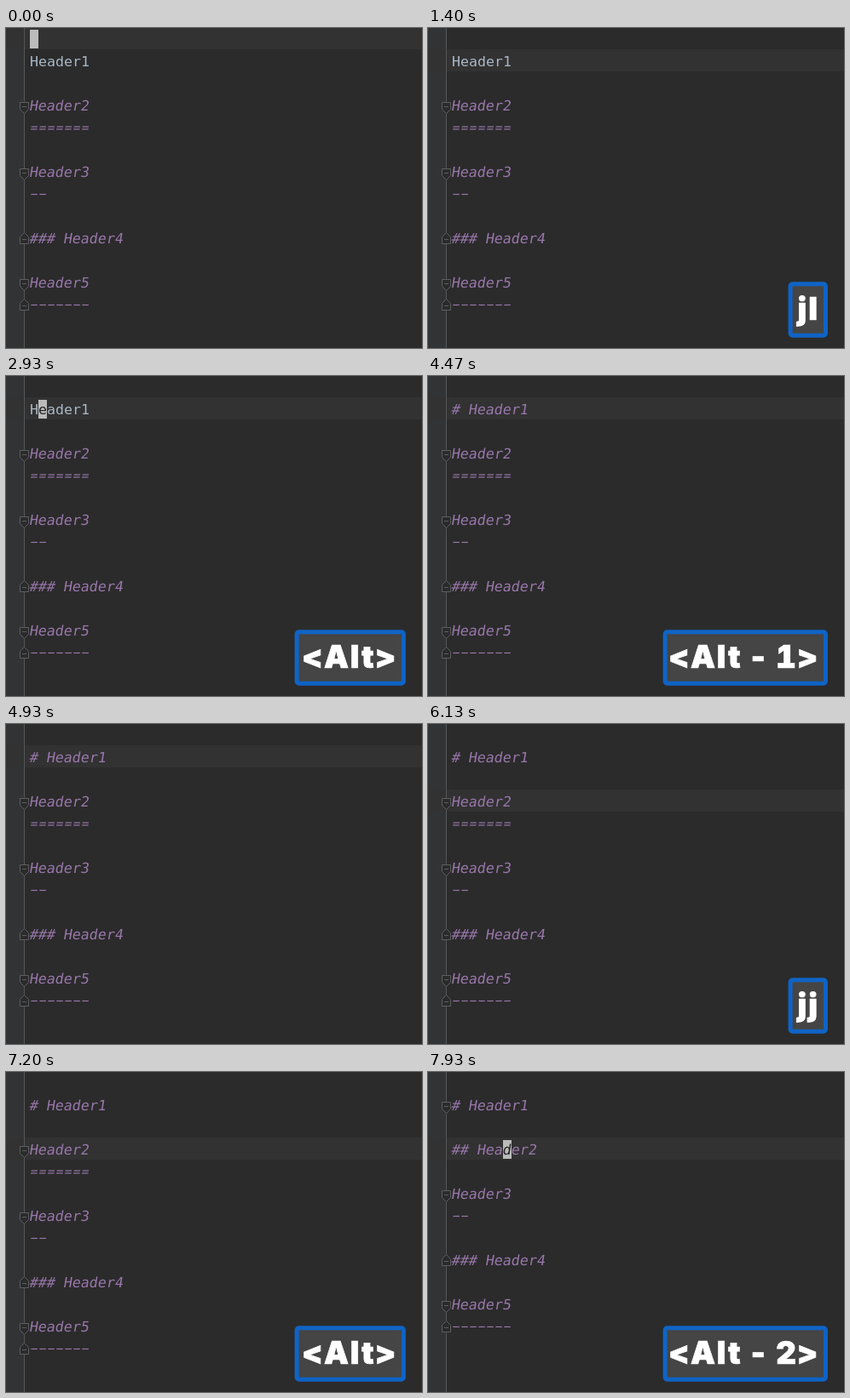
Recreate the animation shown at these times as an HTML page. Size 488 by 376 pixels, loop 8000 ms.

```html
<!DOCTYPE html>
<html lang="en">
<head>
<meta charset="utf-8">
<title>Header toggling</title>
<style>
  html, body { margin: 0; width: 100%; height: 100%; overflow: hidden; background: #2b2b2b; }
  svg { display: block; width: 488px; height: 376px; }
  .code { font: 16.61px "DejaVu Sans Mono", "Noto Sans Mono", monospace; white-space: pre; }
  .rule { font-size: 14.5px; letter-spacing: 1.27px; }
  .keys {
    font: 900 36.5px Inter, "Open Sans", sans-serif;
    font-variant-numeric: tabular-nums;
    letter-spacing: 1.9px;
    word-spacing: -4.6px;
    text-anchor: end;
    fill: #fff;
    stroke: #fff;
    stroke-width: .7px;
  }
</style>
</head>
<body>
<svg viewBox="0 0 488 376">
  <rect width="488" height="376" fill="#2b2b2b"/>
  <rect width="21" height="376" fill="#313335"/>
  <rect id="row" width="488" height="26" fill="#323232"/>
  <path d="M21.5 0V376" stroke="#555657"/>
  <g id="folds" fill="#2b2b2b" stroke="#5c5e60"></g>
  <g id="lines" class="code"></g>
  <g id="caret">
    <rect id="block" width="10" height="22" fill="#bbbbbb"/>
    <g id="under" class="code"></g>
  </g>
  <g id="badge">
    <rect id="frame" y="300.8" height="60.5" rx="2.5" fill="#454545" stroke="#0f64c6" stroke-width="5"/>
    <text id="keys" class="keys" x="459" y="343"></text>
  </g>
</svg>
<script>
const LOOP = 8000, ROW = 26, COL = 10, LEFT = 28;
const PLAIN = '#a9b7c6', HEAD = '#9876aa', DARK = '#232323';
const $ = id => document.getElementById(id);

// Document states; folds map a row to its marker direction
const tail = ['Header3', '−−', '', '### Header4', '', 'Header5', '−−−−−−−'];
const docs = [
  { at: 0, lines: ['', 'Header1', '', 'Header2', '=======', '', ...tail],
    folds: { 3: 'down', 6: 'down', 9: 'up', 11: 'down', 12: 'up' }, plain: 1 },
  { at: 3470, lines: ['', '# Header1', '', 'Header2', '=======', '', ...tail],
    folds: { 3: 'down', 6: 'down', 9: 'up', 11: 'down', 12: 'up' } },
  { at: 7600, lines: ['', '# Header1', '', '## Header2', '', ...tail],
    folds: { 1: 'down', 5: 'down', 8: 'up', 10: 'down', 11: 'up' } }
];

const carets = [
  { at: 0, row: 0, col: 0 },
  { at: 330, row: 1, col: 0 },
  { at: 900, row: 1, col: 1 },
  { at: 3470, row: 1, col: 3 },
  { at: 5000, row: 2, col: 0 },
  { at: 5400, row: 3, col: 3 },
  { at: 7600, row: 3, col: 6 }
];

// The caret is hidden in each of these spans
const blinks = [[1400, 1930], [2400, 2870], [3400, 3930], [4470, 4970], [5900, 6470], [6970, 7470]];

const presses = [
  { at: 0, text: '', x: 468 },
  { at: 330, text: 'j', x: 436 },
  { at: 900, text: 'jl', x: 423, fade: 2070 },
  { at: 2870, text: '<Alt>', x: 339 },
  { at: 3470, text: '<Alt - 1>', x: 276, fade: 4600 },
  { at: 5000, text: 'j', x: 436 },
  { at: 5400, text: 'jj', x: 423, fade: 6530 },
  { at: 7130, text: '<Alt>', x: 339 },
  { at: 7600, text: '<Alt - 2>', x: 276 }
];
const FADE = 330;

const last = (list, t) => list.filter(s => s.at <= t).pop();

function codeText(str, row, col, fill, slanted) {
  const rule = /^[=−]/.test(str);
  const x = LEFT + col * COL - (slanted && !rule ? 1 : 0);
  const y = row * ROW + (rule ? 18.3 : 19);
  const skew = slanted ? ' skewX(-9)' : '';
  return `<text class="${rule ? 'rule' : ''}" transform="translate(${x} ${y})${skew}" fill="${fill}">${str}</text>`;
}

function fold(row, dir) {
  const y = row * ROW;
  return dir === 'down'
    ? `<path d="M16.5 ${y + 9.5}h10v8l-5 5l-5 -5zM19 ${y + 14.5}h5"/>`
    : `<path d="M16.5 ${y + 19.5}h10v-8l-5 -5l-5 5zM19 ${y + 14.5}h5"/>`;
}

let shown = null;
function showDoc(doc) {
  if (doc === shown) return;
  shown = doc;
  $('lines').innerHTML = doc.lines.map((s, i) => {
    const plain = i === doc.plain;
    return codeText(s, i, 0, plain ? PLAIN : HEAD, !plain);
  }).join('');
  $('folds').innerHTML = Object.entries(doc.folds).map(([r, d]) => fold(r, d)).join('');
}

function showCaret(doc, t) {
  const { row, col } = last(carets, t);
  $('row').setAttribute('y', row * ROW - 1);
  $('block').setAttribute('x', LEFT + col * COL);
  $('block').setAttribute('y', row * ROW + 2);
  $('under').innerHTML = codeText(doc.lines[row][col] || '', row, col, DARK, row !== doc.plain);
  const hidden = blinks.some(([a, b]) => t >= a && t < b);
  $('caret').setAttribute('visibility', hidden ? 'hidden' : 'visible');
}

function showBadge(t) {
  const p = last(presses, t);
  let alpha = p.text ? 1 : 0;
  if (p.fade) alpha = Math.max(0, Math.min(1, 1 - (t - p.fade) / FADE));
  $('badge').setAttribute('opacity', alpha);
  $('frame').setAttribute('x', p.x + 2.1);
  $('frame').setAttribute('width', 464.3 - p.x);
  $('keys').textContent = p.text;
}

function draw(t) {
  const doc = last(docs, t);
  showDoc(doc);
  showCaret(doc, t);
  showBadge(t);
}

const start = performance.now();
function tick(now) {
  draw(Math.max(0, now - start) % LOOP);
  requestAnimationFrame(tick);
}
draw(0);
requestAnimationFrame(tick);
</script>
</body>
</html>
```
